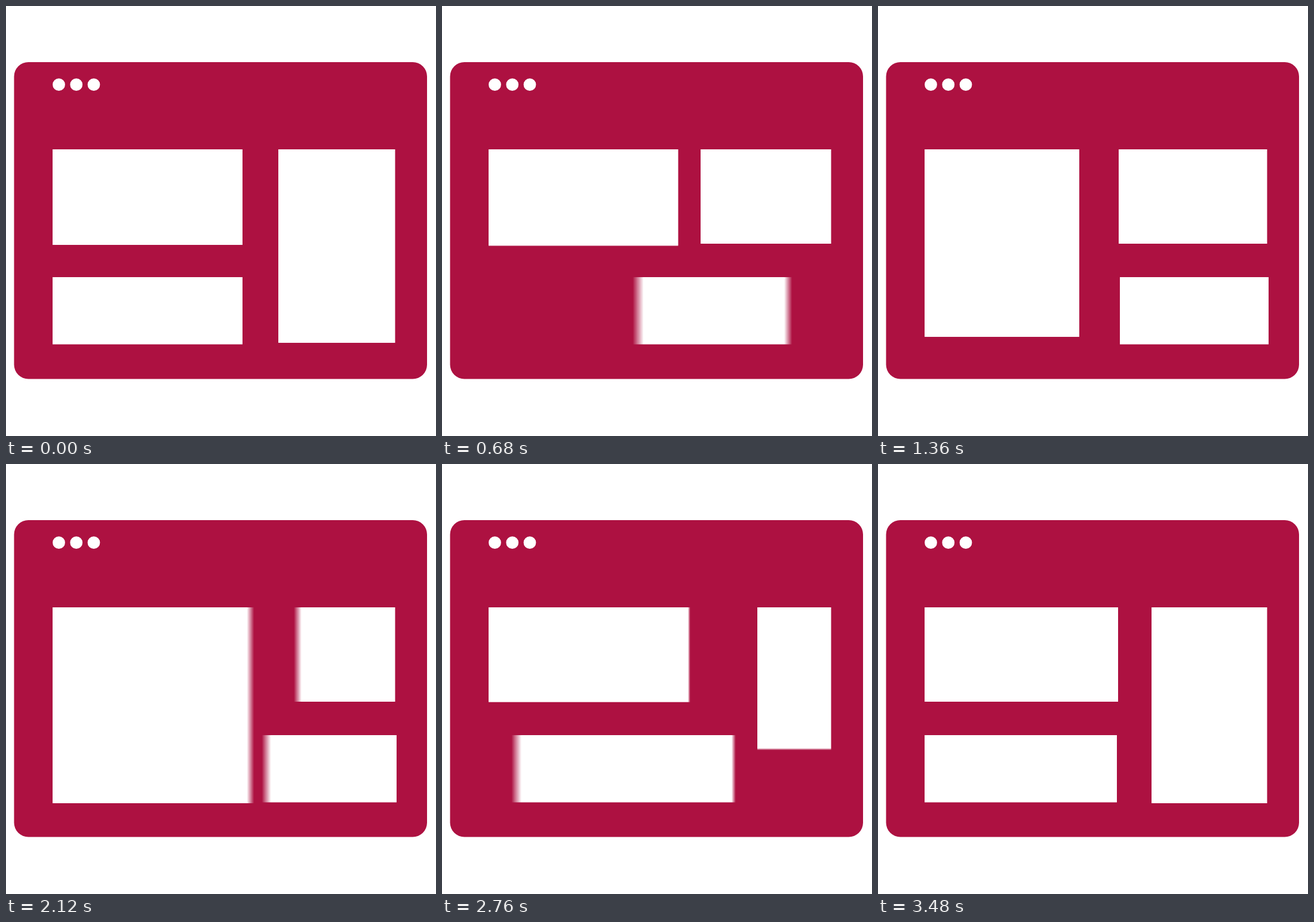
An HTML page with a canvas for the animation above (4 s loop, 720 px wide and 720 px high).

```html
<!DOCTYPE html>
<html lang="en">
<head>
<meta charset="utf-8">
<title>Shifting layout</title>
<style>
  html, body { margin: 0; width: 100%; height: 100%; overflow: hidden; background: #fff; }
  svg, canvas { position: absolute; left: 0; top: 0; width: 720px; height: 720px; }
</style>
</head>
<body>
<svg viewBox="0 0 720 720">
  <rect x="13.5" y="94" width="691.5" height="530.5" rx="24" fill="#ad1141"/>
  <path d="M88.5 131.7h59" stroke="#fff" stroke-width="20.8" stroke-linecap="round" stroke-dasharray="0 29.25"/>
</svg>
<canvas width="720" height="720"></canvas>
<script>
const LOOP = 4000, STEP = 40, SHUTTER = 22, SAMPLES = 15;
const LEFT = 78, RIGHT = 654, TOP = 240, MIDDLE = 398, FOOT_TOP = 454, BOTTOM = 568;
const ctx = document.querySelector('canvas').getContext('2d');

function ease(t, from, to) {
  const u = Math.min(1, Math.max(0, (t - from) / (to - from)));
  return u * u * (3 - 2 * u);
}

function pose(t) {
  const main = { right: 396, bottom: 400 };
  const side = { left: 456, bottom: 564 };
  const foot = { left: LEFT, right: 396 };
  const move = (part, from, to, goal) => {
    const p = ease(t, from, to);
    for (const edge in goal) part[edge] += (goal[edge] - part[edge]) * p;
  };

  // The side shortens, the foot slides under it and the main box grows down.
  move(side, 0, 560, { left: 433, bottom: MIDDLE });
  move(foot, 280, 900, { left: 430, right: RIGHT });
  move(main, 640, 1360, { right: 337, bottom: 554 });
  move(side, 900, 1360, { left: 403 });
  move(foot, 900, 1360, { left: 405 });
  move(main, 1360, 1680, { bottom: BOTTOM });

  // The main box widens and squeezes the others.
  move(main, 1920, 2290, { right: 466 });
  move(side, 1920, 2240, { left: 528 });
  move(foot, 2040, 2280, { left: 524 });

  // The main box shortens, the foot slides back and the side grows down.
  move(main, 2290, 2440, { bottom: 401.5 });
  move(foot, 2280, 2880, { left: LEFT, right: 469 });
  move(side, 2290, 2880, { bottom: 487 });
  move(main, 2440, 2880, { right: 402, bottom: MIDDLE });
  move(foot, 2880, 3040, { right: 400 });
  move(side, 2880, 3480, { left: 458, bottom: BOTTOM });
  return { main, side, foot };
}

function box(left, top, right, bottom) {
  ctx.fillRect(left, top, right - left, bottom - top);
}

function drawBoxes(t) {
  const { main, side, foot } = pose(t);
  box(LEFT, TOP, main.right, main.bottom);
  box(side.left, TOP, RIGHT - 2.5, side.bottom);
  box(foot.left, FOOT_TOP, foot.right, BOTTOM - 1.5);
}

const start = performance.now();
function frame() {
  const now = Math.max(0, performance.now() - start) % LOOP;
  const t = Math.floor(now / STEP) * STEP;
  ctx.clearRect(0, 0, 720, 720);
  ctx.fillStyle = '#fff';
  // Summed faint copies give the motion blur.
  ctx.globalCompositeOperation = 'lighter';
  ctx.globalAlpha = 1 / SAMPLES;
  for (let i = 0; i < SAMPLES; i++) {
    drawBoxes(t + SHUTTER * (i / (SAMPLES - 1) - 0.5));
  }
  requestAnimationFrame(frame);
}
frame();
</script>
</body>
</html>
```
